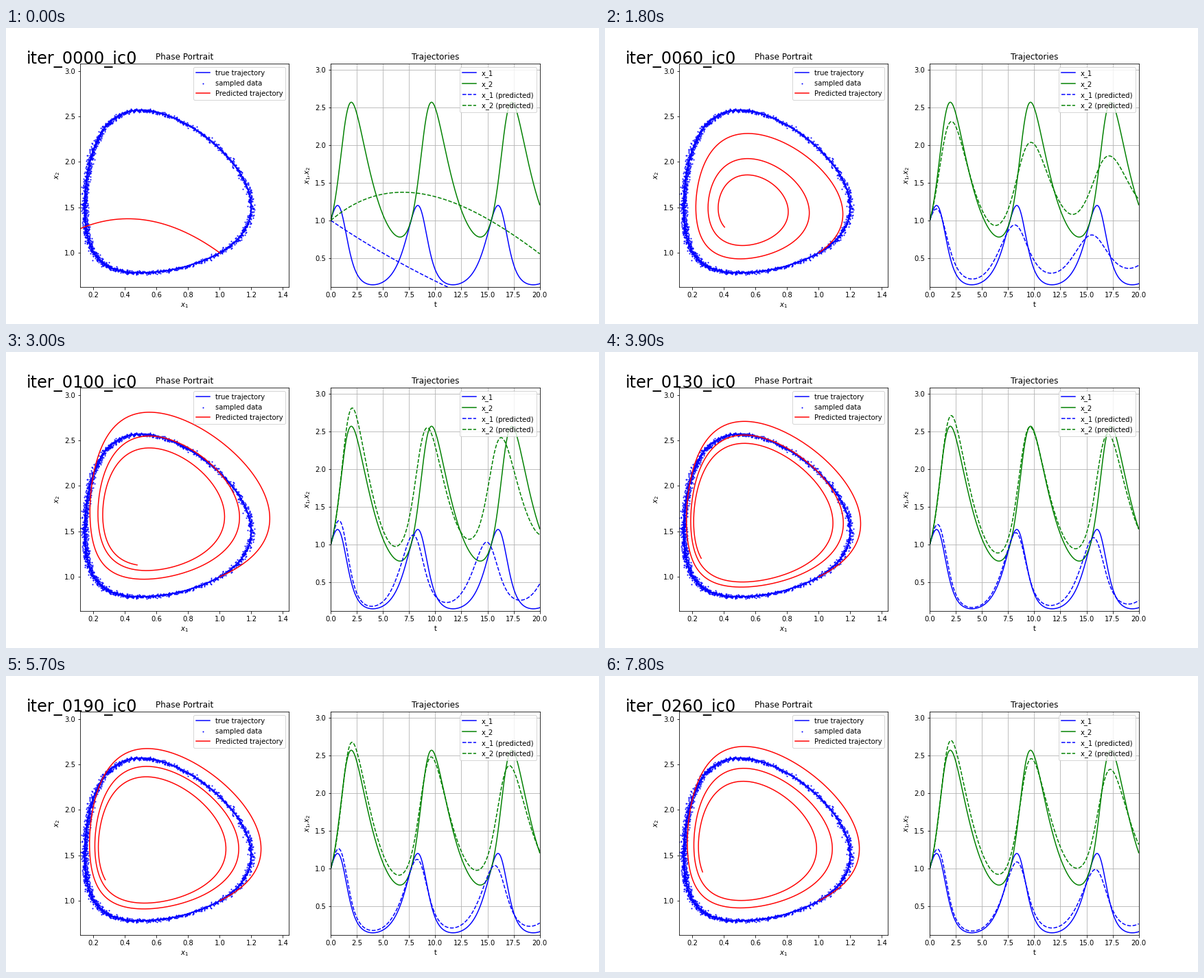
Recreate the animation shown at these times as a matplotlib script. Size 864 by 432 pixels, loop 8 s.

```python
import numpy as np
import matplotlib.pyplot as plt
from matplotlib.animation import FuncAnimation

SPAN = 20.0
SPEED = 0.955

# Learned orbit by training iteration:
# iteration, centre x1, centre x2, damping, energy floor, damping direction (degrees)
STAGES = np.array([
    (60, 0.545, 1.485, 0.100, 0.000, -45),
    (100, 0.555, 1.670, 0.105, 0.094, -90),
    (130, 0.530, 1.597, 0.069, 0.131, -90),
    (170, 0.533, 1.577, 0.080, 0.083, -180),
    (220, 0.527, 1.563, 0.054, 0.131, -180),
    (260, 0.517, 1.573, 0.069, 0.075, -180),
])


def cycle(x, y, xc, yc):
    """Predator-prey flow around the centre (xc, yc)."""
    return np.array([x * (yc - y), y * (x - xc)])


def untrained(x, y):
    return np.array([-0.062 - 0.032 * x, -0.0115 + 0.175 * x - 0.045 * y])


def learned(x, y, xc, yc, damping, floor, direction):
    """Cycle whose energy decays to a floor, fastest on one side of the orbit."""
    x, y = np.maximum(x, 0.02), np.maximum(y, 0.02)
    u, v = np.log(x / xc), np.log(y / yc)
    energy = x - xc - xc * u + y - yc - yc * v
    grad = np.array([1 - xc / x, 1 - yc / y])
    side = 1 + np.cos(np.arctan2(v, u) - np.radians(direction))
    decay = damping * side * (energy - floor) / ((grad ** 2).sum(axis=0) + 1e-6)
    return SPEED * cycle(x, y, xc, yc) - decay * grad


def integrate(flow, count, steps):
    """RK4 from (1, 1) for a batch of systems; result is (steps + 1, 2, count)."""
    h = SPAN / steps
    state = np.ones((2, count))
    path = [state]
    for _ in range(steps):
        k1 = flow(*state)
        k2 = flow(*(state + h / 2 * k1))
        k3 = flow(*(state + h / 2 * k2))
        k4 = flow(*(state + h * k3))
        state = state + h / 6 * (k1 + 2 * k2 + 2 * k3 + k4)
        path.append(state)
    return np.array(path)


iterations = np.arange(0, 270, 10)
params = [np.interp(iterations, STAGES[:, 0], column) for column in STAGES[:, 1:].T]
trained = np.minimum(iterations / STAGES[0, 0], 1)


def training_flow(x, y):
    return (1 - trained) * untrained(x, y) + trained * learned(x, y, *params)


predicted = integrate(training_flow, len(iterations), 800)
t_pred = np.linspace(0, SPAN, len(predicted))

true = integrate(lambda x, y: cycle(x, y, 0.5, 1.5), 1, 2000)[..., 0]
t_true = np.linspace(0, SPAN, len(true))
samples = true + np.random.default_rng(4).normal(0, 0.01, true.shape)
low, high = true.min(axis=0) * 0.8, true.max(axis=0) * 1.2

plt.rcParams["font.family"] = "DejaVu Sans"
fig, (phase, series) = plt.subplots(1, 2, figsize=(12, 6), dpi=72, facecolor="white")
fig.subplots_adjust(left=0.125, right=0.9, bottom=0.125, top=0.88, wspace=0.2)

phase.plot(*true.T, "b", label="true trajectory")
phase.scatter(*samples.T, s=1, color="b", label="sampled data")
orbit, = phase.plot([], [], "r", label="Predicted trajectory")
phase.set(title="Phase Portrait", xlabel="$x_1$", ylabel="$x_2$",
          xlim=(low[0], high[0]), ylim=(low[1], high[1]))
phase.legend(loc="upper right")

for values, color, name in zip(true.T, "bg", ("x_1", "x_2")):
    series.plot(t_true, values, color, label=name)
dashed = [series.plot([], [], color + "--", label=name + " (predicted)")[0]
          for color, name in zip("bg", ("x_1", "x_2"))]
series.set(title="Trajectories", xlabel="t", ylabel="$x_1$,$x_2$",
           xlim=(0, SPAN), ylim=(low.min(), high.max()))
series.grid(True)
series.legend(loc="upper right")

caption = fig.text(30 / 864, 1 - 52 / 432, "", fontsize=24)


def update(frame):
    step = frame // 3
    x, y = predicted[..., step].T
    orbit.set_data(x, y)
    for line, values in zip(dashed, (x, y)):
        line.set_data(t_pred, values)
    caption.set_text(f"iter_{iterations[step]:04d}_ic0")
    return orbit, *dashed, caption


anim = FuncAnimation(fig, update, frames=80, interval=100, repeat=True,
                     repeat_delay=0, blit=False)
plt.show()
```
